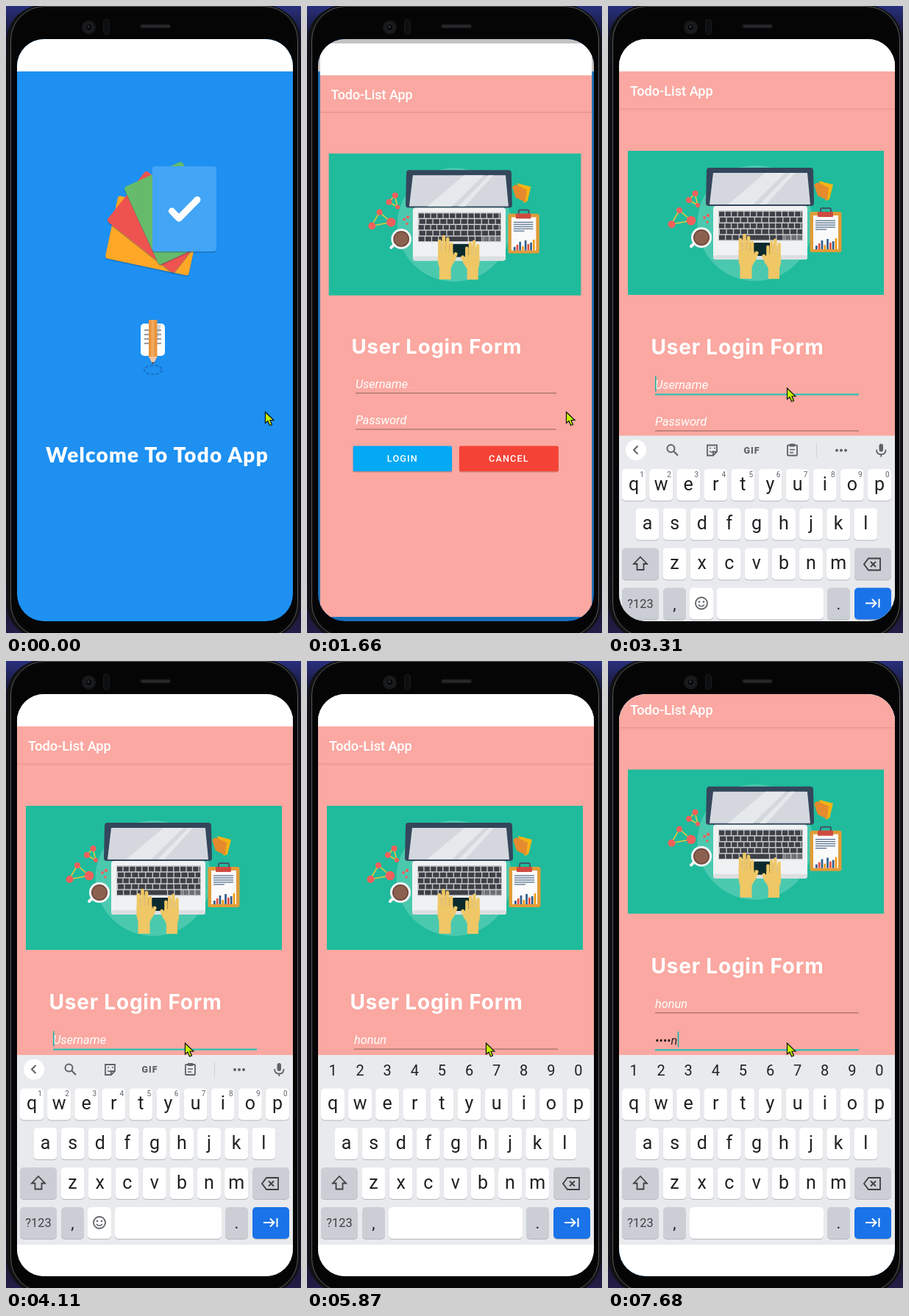
An HTML page for the animation above (8 s loop, 401 px wide and 853 px high).

```html
<!DOCTYPE html>
<html lang="en">
<head>
<meta charset="utf-8">
<title>Todo app</title>
<style>
html, body { margin: 0; height: 100%; overflow: hidden; background: #0b0a14; }
svg { display: block; width: 100vw; height: 100vh; font-family: Roboto, sans-serif; }
.mid { text-anchor: middle; }
.welcome { font: 900 28px Lato, sans-serif; letter-spacing: 1.2px; }
.heading { font: 700 28px Inter, sans-serif; letter-spacing: .8px; }
.field { font-size: 16.4px; font-style: italic; fill: #fff; white-space: pre; }
.btn { font-size: 12.8px; font-weight: 500; letter-spacing: 1.2px; fill: #fff; }
</style>
</head>
<body>
<svg id="stage" viewBox="0 0 401 853"></svg>
<script>
const LOOP = 8000, NAME = 'honun', PITCH = 37.1;
const rect = (x, y, w, h, fill, r = 0, more = '') =>
  `<rect x="${x}" y="${y}" width="${w}" height="${h}" rx="${r}" fill="${fill}" ${more}/>`;
const circle = (x, y, r, fill, more = '') => `<circle cx="${x}" cy="${y}" r="${r}" fill="${fill}" ${more}/>`;
const poly = (points, fill) => `<polygon points="${points}" fill="${fill}"/>`;
const line = (d, stroke, width = 2, more = '') =>
  `<path d="${d}" fill="none" stroke="${stroke}" stroke-width="${width}" ${more}/>`;
const text = (x, y, s, size, fill, more = 'class="mid"') =>
  `<text x="${x}" y="${y}" font-size="${size}" fill="${fill}" ${more}>${s}</text>`;
const group = (id, body, more = '') => `<g id="${id}" ${more}>${body}</g>`;
const each = (list, fn) => [...list].map(fn).join('');
const ROUND = 'stroke-linecap="round" stroke-linejoin="round"';

function phone() {
  return rect(0, 0, 401, 853, 'url(#wall)') +
    rect(1, -1, 399, 862, '#111214', 48) +
    rect(6.5, .5, 390, 858, '#070708', 46, 'stroke="#56585c"') +
    rect(10, 5, 383, 849, '#050506', 42) +
    circle(112.5, 29, 9.5, '#17181a') + circle(112.5, 29, 5, '#090a0c', 'stroke="#2b2d31"') + circle(112, 28, 1.5, '#34373c') +
    rect(132.5, 18, 8, 21, '#0d0e0f', 4, 'stroke="#191a1c"') +
    rect(182, 24.5, 42, 6, '#17181a', 3) +
    line('M185 27.5h37', '#38393c', 3, 'stroke-dasharray="1 1"');
}

function splash() {
  const card = (x, y, angle, fill) => {
    const shape = (dy, color, more) => `<g transform="translate(${x} ${y + dy}) rotate(${angle})">${rect(0, 0, 87, 116, color, 4, more)}</g>`;
    return shape(1.5, '#0b3d70', 'opacity=".35"') + shape(0, fill);
  };
  const pencil = rect(194, 427, 11.5, 51, '#e8953f') + rect(197.5, 427, 4, 51, '#f2aa5d') +
    poly('194,477 205.5,477 199.7,488', '#f5c6a8') + poly('198,484.5 201.5,484.5 199.7,488', '#33405a');
  return rect(15, 45, 375, 792, '#1d90f1') + rect(15, 45, 375, 44, '#fff') +
    card(134.5, 343, -78, '#ffa726') + card(136.5, 292, -51.7, '#ef5350') +
    card(160, 247, -24.5, '#66bb6a') + card(199, 218, 0, '#42a5f5') +
    line('M225.5 279l9.5 10 25-25.5', '#fff', 9, ROUND) +
    rect(183, 432, 33, 44, '#fff', 5) + poly('205,433 211,433 205,459', '#d3d8dc') +
    each([441, 447, 453, 459], y => line(`M188 ${y}h23`, '#9a9da2', 2.2)) +
    group('ring', '<ellipse cx="200" cy="495" rx="12" ry="6" fill="none" stroke="#1a70c2" stroke-width="2" stroke-dasharray="4 2.5"/>') +
    `<g clip-path="url(#note)">${group('pencil', pencil)}</g>` +
    '<text class="mid welcome" x="205.5" y="621" fill="#fff">Welcome To Todo App</text>';
}

function desk() {
  const hand = (x, y, sx, sy) => `<g transform="translate(${x} ${y}) scale(${sx} ${sy})">` +
    line('M-8 9v20M-2.5 3v26M3 6v22M8 13v15', '#efc765', 4.6, ROUND) +
    line('M10 37l4-10', '#efc765', 5, ROUND) +
    '<path d="M-10.5 24h21l1 14-4 8v16h-16v-16l-2-8z" fill="#efc765"/>' +
    line('M-5.3 12v12M.3 9v15M5.5 13v11', '#c99b45', .7) + '</g>';
  const atom = (x, y, r) => circle(x, y, r, '#f2605c');
  const bars = [5, 8, 12, 6, 14, 9, 11, 15], inks = ['#2f5d8a', '#e74c3c', '#2f5d8a', '#f39c12'];
  return rect(27, 197, 348, 196, '#1fbb9c') + circle(200, 295.5, 78.5, '#4bc9af') +
    line('M97 278L86 297L113 292ZM118 255L110 264L122 271Z', '#e8c63c', 1.6) +
    atom(97, 278, 4) + atom(86.5, 297, 5) + atom(113, 292, 6.3) +
    atom(118.5, 255, 4) + atom(110, 264, 4) + atom(122, 271, 3) +
    atom(131, 288, 2) + atom(136, 285, 2.2) + atom(135, 294, 1.8) +
    line('M117 323l-4 4', '#f4f4f4', 4, ROUND) + circle(127, 315, 14, '#f4f4f4') + circle(127, 315, 11, '#6b4438') + circle(127, 315, 9.5, '#8c604e') +
    '<path d="M138 220h137q4 0 4 4l1 44q0 4-4 4H137q-4 0-4-4l1-44q0-4 4-4z" fill="#34465b"/>' +
    poly('143,227 271,227 275,270 138,270', '#d4d8de') +
    poly('214,227 241,227 197,270 163,270', '#e6e9ec') + poly('248,227 254,227 215,270 206,270', '#e6e9ec') +
    rect(143, 272, 128, 73, '#f0f1f2', 4) + rect(143, 339, 128, 6, '#dcdfe1', 3) +
    rect(150, 278, 115, 41.5, '#c9cbcd', 1) +
    each([283, 291, 299, 307], (y, i) => line(`M${151 + i % 2} ${y}H264`, '#3d4046', 6.5, `stroke-dasharray="${7.3 + i % 2} 1.3"`)) +
    line('M151 315H240', '#3d4046', 6.5, 'stroke-dasharray="8 1.3 8 1.3 8 1.3 40 1.3"') +
    line('M241 315H264', '#6d7074', 6.5, 'stroke-dasharray="7 1.2"') +
    rect(198, 322, 25, 18, '#0c2a2e', 1) +
    hand(188, 309, 1, 1) + hand(225, 316, -.95, .89) +
    poly('287,238 306,243 301,263 296,265', '#f4b414') + poly('280,243 285,240 300,247 298,264 285,258', '#e68a2e') +
    rect(274.5, 280, 43, 55, '#e09c38', 3) + rect(279, 285, 34, 46, '#fafafa') +
    rect(289, 275, 14, 8, 'none', 2, 'stroke="#44556a" stroke-width="2"') + rect(285, 280, 21, 7, '#cf4a3f', 1) +
    each([292, 295, 298, 301, 304], y => line(`M282 ${y}H${y > 302 ? 297 : 309}`, '#56718f', 1.3)) +
    each(bars, (h, i) => rect(282 + i * 3.8, 331 - h, 2.7, h, inks[i % 4]));
}

function login() {
  const button = (x, w, fill, label) => rect(x, 602.5, w, 35, '#9b5f5a', 2, 'opacity=".5"') +
    rect(x, 601, w, 35, fill, 2) + `<text class="mid btn" x="${x + w / 2}" y="623">${label}</text>`;
  const field = (id, y) => rect(64, y + 6.5, 277, 1, '#8f615d', 0, `id="${id}Line"`) +
    `<text class="field" id="${id}" x="64" y="${y}"></text>`;
  return rect(15, 45, 375, 792, '#faa8a1') + rect(15, 45, 375, 44, '#fff') +
    rect(15, 139.5, 375, 1, '#df958f') + rect(15, 140.5, 375, 1.5, '#f3a29b') +
    text(30, 122, 'Todo-List App', 18.2, '#fff', 'font-weight="500"') + desk() +
    '<text class="mid heading" x="176" y="474" fill="#fff">User Login Form</text>' +
    field('user', 521) + field('pass', 571) +
    button(60.5, 136.5, '#03a9f4', 'LOGIN') + button(207, 137, '#f44336', 'CANCEL') +
    rect(64, 503.5, 1.5, 21, '#10b5a6', 0, 'id="caret"');
}

function keyboard() {
  const ink = '#202124', soft = '#5f6368', grey = '#cbced5';
  const key = (x, y, w, fill = '#fff') => rect(x, y + 1, w, 43, '#b4b7bc', 5) + rect(x, y, w, 43, fill, 5);
  const row = (letters, x0, y) => each(letters, (c, i) => key(x0 + PITCH * i - 16, y, 32) + text(x0 + PITCH * i, y + 28.5, c, 25, ink));
  const round = d => circle(38, 555.5, 14, '#fff') + line(d, soft, 2);
  const digit = i => (i + 1) % 10, ten = '0123456789';
  const mic = rect(368.5, 547, 5.5, 11, soft, 3) + line('M365 555q0 6.5 6.3 6.5t6.3-6.5M371.3 561v4', soft, 1.8);
  const tools = round('M40.5 550l-5.5 5.5 5.5 5.5') +
    circle(85.5, 553.5, 5, 'none', `stroke="${soft}" stroke-width="2"`) + line('M89 557l6 6', soft, 2.2) +
    line('M135 549h13v9l-5 5h-8zM148 558h-5v5', soft, 1.8) + line('M138 553h2M144 553h2M138 557q3 3 5 0', soft, 1.6) +
    text(195.5, 560, 'GIF', 12.5, soft, 'class="mid" font-weight="900" letter-spacing="1"') +
    rect(244, 549, 13, 14, 'none', 1, `stroke="${soft}" stroke-width="1.8"`) + rect(247, 547, 7, 4, soft) + line('M247 555h7M247 559h5', soft, 1.4) +
    rect(283, 546, 1, 20, '#cfd1d5') + each([311, 317, 323], x => circle(x, 556, 2, soft)) + mic;
  const words = round('M35.5 550l5.5 5.5-5.5 5.5') + rect(146, 545, 1, 22, '#c6c8cc') + rect(256, 545, 1, 22, '#c6c8cc') +
    each([97, 201, 305], x => text(x, 562, '', 16.4, '#4a4d51', 'class="mid word"')) + mic;
  const smile = key(111, 743, 32) + circle(127, 764, 8, 'none', `stroke="${soft}" stroke-width="1.8"`) +
    circle(124, 762, 1.3, soft) + circle(130, 762, 1.3, soft) + line('M123 766q4 4.5 8 0', soft, 1.6);
  return rect(15, 536, 375, 258, '#e8eaed') + rect(15, 794, 375, 100, '#fff') +
    row('qwertyuiop', 35, 581.5) + row('asdfghjkl', 53.5, 635) + row('zxcvbnm', 90.5, 689) +
    key(19, 689, 50, grey) + line('M44 701l9 9.5h-4.5v8h-9v-8H35z', '#3c4043', 1.8) +
    key(335, 689, 50, grey) + line('M354 703h16v16H354l-6-8zM357 707.5l7 7M364 707.5l-7 7', '#3c4043', 1.8) +
    key(19, 743, 50, grey) + text(44, 770, '?123', 16.4, '#3c4043') +
    key(75, 743, 31, grey) + text(90.5, 772, ',', 22, ink) +
    key(298, 743, 31, grey) + text(313.5, 772, '.', 22, ink) +
    key(335, 743, 50, '#1a73e8') + line('M350 764h14M359 758.5l5.5 5.5-5.5 5.5M368.5 758v12', '#fff', 2) +
    group('plain', smile + key(148, 743, 145) + each(ten, (c, i) => text(46 + PITCH * i, 592, digit(i), 10, soft))) +
    group('secret', key(111, 743, 182) + each(ten, (c, i) => text(35 + PITCH * i, 563.5, digit(i), 20, ink))) +
    group('tools', tools) + group('words', words);
}

const stage = document.getElementById('stage');
stage.innerHTML = `<defs>
  <linearGradient id="wall" x2="0" y2="1"><stop stop-color="#29307c"/><stop offset=".05" stop-color="#15152f"/><stop offset=".1" stop-color="#0b0b10"/><stop offset=".9" stop-color="#0b0b10"/><stop offset="1" stop-color="#241d48"/></linearGradient>
  <clipPath id="glass">${rect(15, 45, 375, 792, '#000', 37)}</clipPath>
  <clipPath id="note">${rect(180, 427, 40, 80, '#000')}</clipPath></defs>` + phone() +
  `<g clip-path="url(#glass)">${splash() + rect(15, 45, 375, 792, '#000', 0, 'id="dim" opacity=".24"') + group('login', login()) + group('board', keyboard())}</g>` +
  group('mouse', '<path d="M0 0V15L3.5 12L6 18L9 17L6.5 11H11.5Z" fill="#c6f500" stroke="#111" stroke-width="1.2"/>');

const $ = id => document.getElementById(id);
const words = document.querySelectorAll('.word');
const show = (id, on) => $(id).style.display = on ? '' : 'none';
const move = (id, x, y) => $(id).setAttribute('transform', `translate(${x} ${y})`);

// value of the last [time, value] step already reached
const step = (t, steps) => steps.reduce((v, [at, next]) => t >= at ? next : v, steps[0][1]);
const CHIPS = [[], ['h', 'he', 'hi'], ['ho', 'how', 'home'], ['hon', NAME, 'won'], ['honu', NAME, 'honey'], [NAME, 'honey', 'won']];

function setField(id, value, hint, y, active) {
  $(id).textContent = value || hint;
  const bar = $(id + 'Line');
  bar.setAttribute('fill', active ? '#19c3b5' : '#8f615d');
  bar.setAttribute('height', active ? 2 : 1);
  if (!active) return;
  const x = 64 + (value ? $(id).getComputedTextLength() + .5 : 0);
  $('caret').setAttribute('x', x);
  $('caret').setAttribute('y', y);
}

function draw(t) {
  const drawn = Math.min(10, Math.max(0, Math.floor((t - 120) / 141) + 1)) / 10;
  move('pencil', 0, -4 * drawn);
  $('ring').setAttribute('opacity', 1 - .75 * drawn);

  const opening = t >= 1660 && t < 1810;
  show('dim', opening);
  show('login', t >= 1660);
  const pan = step(t, [[0, 0], [5890, -26], [6020, -49.3]]);
  if (opening) $('login').setAttribute('transform', 'translate(202.5 441) scale(.985) translate(-202.5 -441)');
  else move('login', 0, pan);

  const secret = t >= 5760;
  const typed = step(t, [[0, 0], [4380, 1], [4500, 2], [4810, 3], [5480, 4], [5620, 5]]);
  const keyed = step(t, [[0, 0], [6450, 1], [6730, 2], [6880, 3], [7530, 4], [7680, 5]]);
  setField('user', NAME.slice(0, typed), 'Username', 503.5, t >= 3040 && !secret);
  setField('pass', keyed ? '•'.repeat(keyed - 1) + NAME[keyed - 1] : '', 'Password', 553.5, secret);
  $('user').style.textDecoration = typed && !secret ? 'underline' : 'none';
  $('pass').style.fill = keyed ? '#2b2020' : '#fff';
  show('caret', step(t, [[0, 0], [3040, 1], [3710, 0], [4110, 1], [7250, 0], [7530, 1]]));

  show('board', t >= 3310);
  move('board', 0, t < 3430 ? 48.5 : 0);
  show('secret', secret);
  show('plain', !secret);
  show('tools', !typed);
  show('words', typed && !secret);
  words.forEach((w, i) => w.textContent = CHIPS[typed][i] || '');

  move('mouse', ...step(t, [[0, [352.5, 552.5]], [2210, [299, 537]], [2330, [265, 527]], [2480, [243.5, 520]]]));
}

const start = performance.now();
(function tick() {
  draw((performance.now() - start) % LOOP);
  requestAnimationFrame(tick);
})();
</script>
</body>
</html>
```
